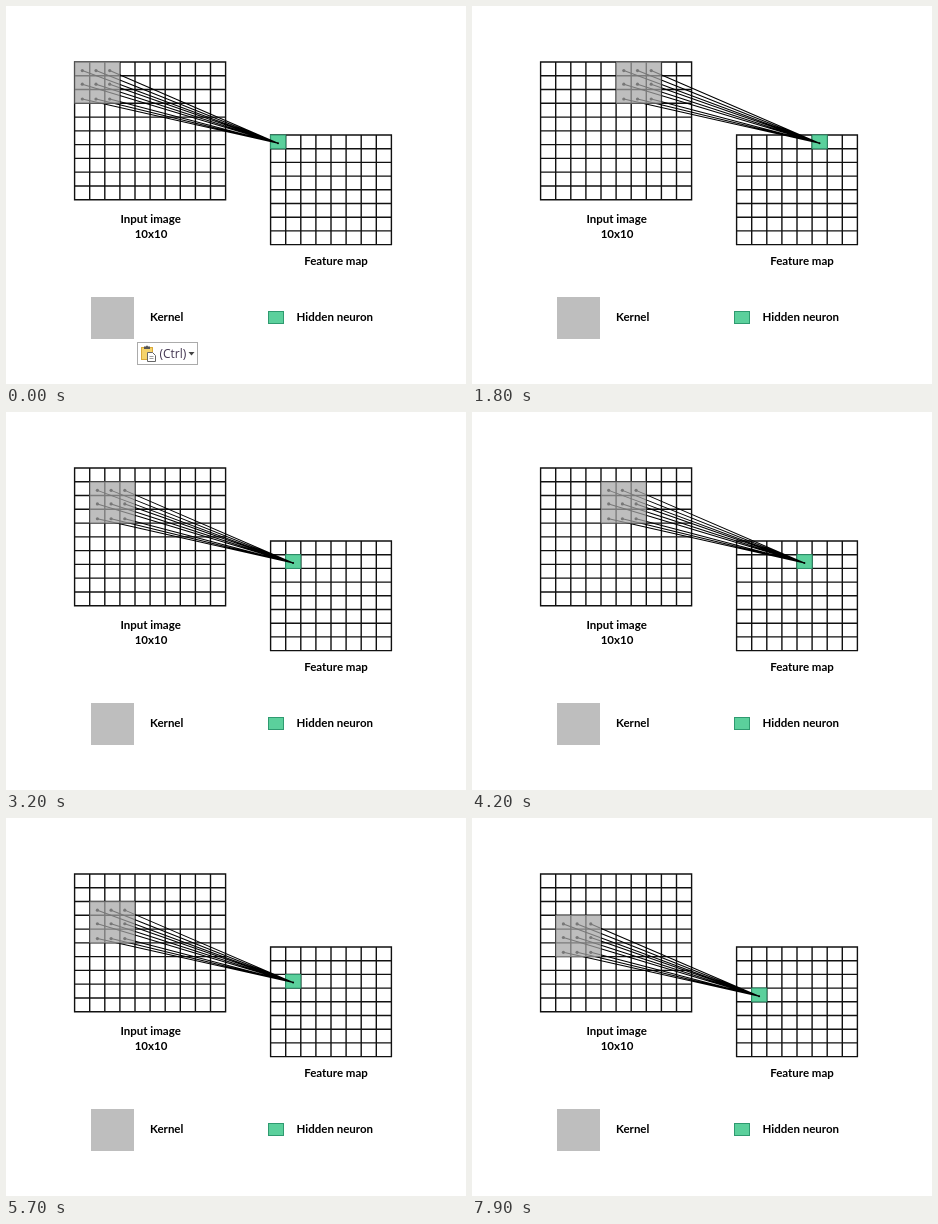
An HTML page for the animation above (8 s loop, 460 by 378 pixels).

```html
<!DOCTYPE html>
<html lang="en">
<head>
<meta charset="utf-8">
<title>Convolution kernel</title>
<style>
html, body { margin: 0; width: 100%; height: 100%; overflow: hidden; background: #fff; }
svg { display: block; width: 460px; height: 378px; }
.label { font: bold 11.5px Lato, "Open Sans", sans-serif; fill: #000; }
.mid { text-anchor: middle; }
.grid { fill: none; stroke: #111; stroke-width: 1.4; stroke-linecap: square; }
.rays { fill: none; stroke: #000; stroke-width: 1.05; }
.kernel { fill: #a6a6a6; fill-opacity: .72; }
.neuron { fill: #5bd09c; stroke: #2f9a70; }
</style>
</head>
<body>
<svg viewBox="0 0 460 378">
  <rect width="460" height="378" fill="#fff"/>
  <path id="inputGrid" class="grid"/>
  <path id="mapGrid" class="grid"/>
  <rect id="neuron" class="neuron" width="15.1" height="13.7"/>
  <path id="rays" class="rays"/>
  <g id="dots"></g>
  <rect id="kernel" class="kernel" width="45.5" height="42"/>

  <text class="label mid" x="144.6" y="217">Input image</text>
  <text class="label mid" x="145" y="232">10x10</text>
  <text class="label mid" x="330" y="259">Feature map</text>
  <rect class="kernel" x="85" y="291" width="43" height="42"/>
  <text class="label" x="144" y="315">Kernel</text>
  <rect class="neuron" x="262.5" y="305.5" width="15" height="12"/>
  <text class="label" x="290.5" y="315">Hidden neuron</text>

  <g id="popup">
    <rect x="131.5" y="336.5" width="60" height="22" fill="#fff" stroke="#ababab"/>
    <rect x="135.5" y="341.5" width="11" height="12" fill="#f5d36b" stroke="#d9a93a"/>
    <path d="M138 343v-2.5h2q1-2 2 0h2V343z" fill="#555"/>
    <path d="M141.5 346.5h5l3 3v6h-8z" fill="#fff" stroke="#666"/>
    <path d="M143.5 350.5h4M143.5 352.5h4" stroke="#888" stroke-width=".8"/>
    <text x="153.5" y="352" font-family="Open Sans, sans-serif" font-size="12" fill="#443752">(Ctrl)</text>
    <path d="M182.5 346h6l-3 3.5z" fill="#444"/>
  </g>
</svg>
<script>
const LOOP = 8000, CELL = 15.1, MAP_COLS = 8;
const input = { x: 68.6, y: 56, n: 10, h: 13.77 };
const map = { x: 264.6, y: 129, n: MAP_COLS, h: 13.7 };
const dotX = [7.7, 21.4, 35.1], dotY = [8.6, 22.2, 37];
// times at which the kernel moves on by one cell
const moves = [400, 800, 1200, 1500, 1800, 2200, 2500, 2900, 3200, 3500, 3800, 4200,
  4500, 4800, 5100, 5400, 5700, 6000, 6200, 6500, 6800, 7100, 7300, 7600, 7900];
const el = id => document.getElementById(id);

function place(node, x, y) {
  node.setAttribute("x", x);
  node.setAttribute("y", y);
}

function gridPath({ x, y, n, h }) {
  let d = "";
  for (let i = 0; i <= n; i++) {
    d += `M${x + i * CELL} ${y}v${n * h}M${x} ${y + i * h}h${n * CELL}`;
  }
  return d;
}

el("inputGrid").setAttribute("d", gridPath(input));
el("mapGrid").setAttribute("d", gridPath(map));

const dots = Array.from({ length: 10 }, () => {
  const dot = document.createElementNS("http://www.w3.org/2000/svg", "circle");
  dot.setAttribute("r", 1.6);
  return el("dots").appendChild(dot);
});

function moveDot(dot, x, y) {
  dot.setAttribute("cx", x);
  dot.setAttribute("cy", y);
}

function draw(t) {
  const step = moves.filter(m => m <= t).length;
  const col = step % MAP_COLS, row = Math.floor(step / MAP_COLS);
  const kx = input.x + col * CELL, ky = input.y + row * input.h;
  const nx = map.x + col * CELL, ny = map.y + row * map.h;
  const tipX = nx + 7.4, tipY = ny + 8.2;

  place(el("kernel"), kx - .2, ky - .3);
  place(el("neuron"), nx, ny);

  let d = "";
  dotY.forEach((dy, j) => dotX.forEach((dx, i) => {
    const x = kx + dx, y = ky + dy;
    moveDot(dots[j * 3 + i], x, y);
    d += `M${x} ${y}L${tipX} ${tipY}`;
  }));
  moveDot(dots[9], tipX, tipY);
  dots[9].setAttribute("r", 1);
  el("rays").setAttribute("d", d);
  el("popup").style.display = t < 300 ? "" : "none";
}

const start = performance.now();
function tick() {
  draw((performance.now() - start) % LOOP);
  requestAnimationFrame(tick);
}
draw(0);
requestAnimationFrame(tick);
</script>
</body>
</html>
```
